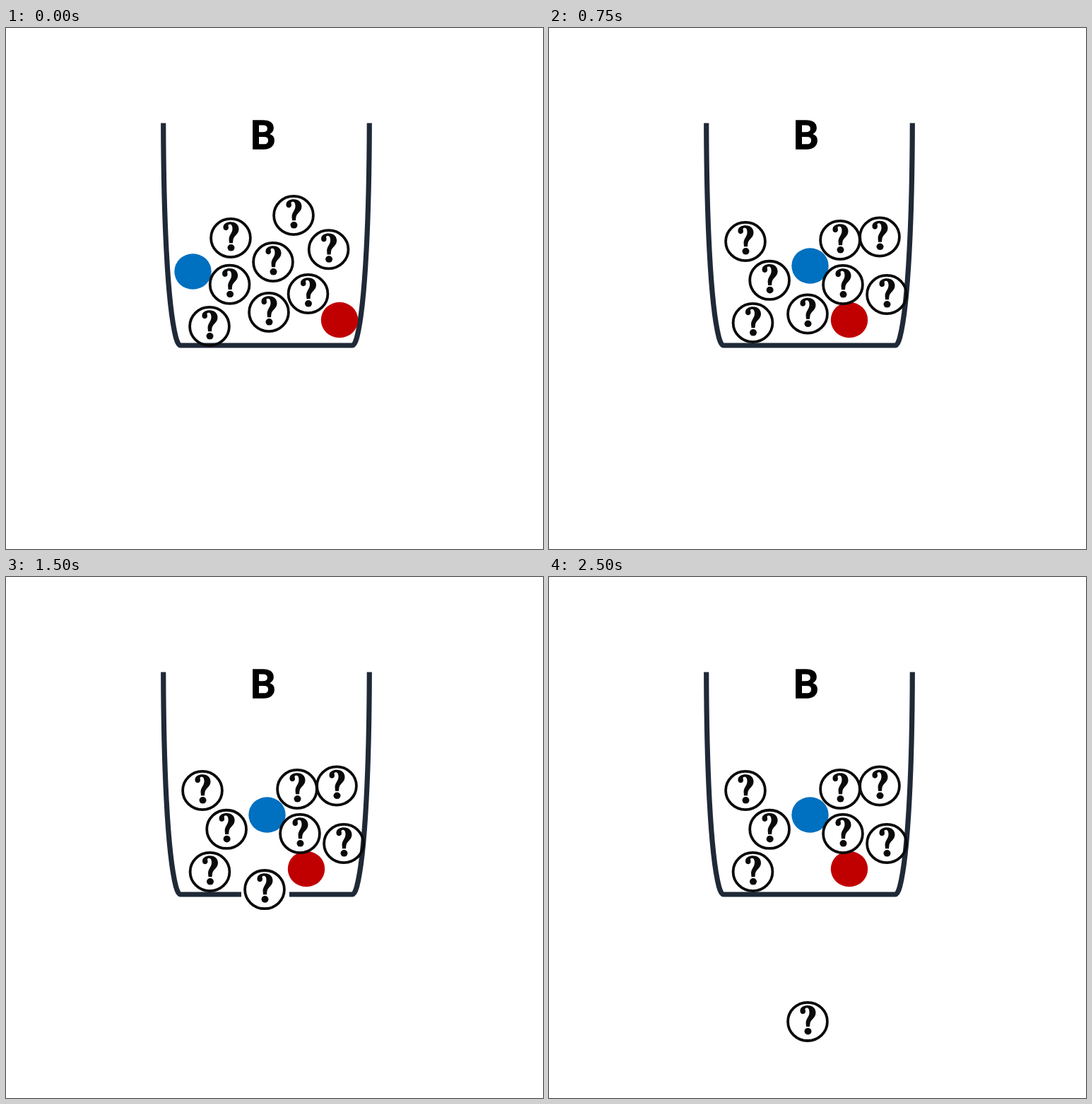
Recreate the animation shown at these times as an HTML page with a canvas. Size 760x737 px, loop 2750 ms.

```html
<!DOCTYPE html>
<html lang="en">
<head>
<meta charset="utf-8">
<title>Urn B</title>
<style>
  html, body { margin: 0; width: 100%; height: 100%; overflow: hidden; background: #fff; }
  canvas { display: block; }
</style>
</head>
<body>
<canvas id="stage" width="760" height="737"></canvas>
<script>
const ctx = document.getElementById("stage").getContext("2d");
const STEP = 250, STEPS = 11, LAST_MIX = 3;

const urn = new Path2D(
  "M222.7 134.5C223 260 228 390 240.5 438Q243.5 449 247 449" +
  "H490Q493.5 449 496.5 438C509 390 514 260 514.3 134.5");
const hook = new Path2D(
  "M-10.5-16C-10-20.5-5-22.8 0-22.8C7.5-22.8 11.5-18.5 11.5-12.5" +
  "C11.5-5 4-3.5 3.4 3L3 7.2L-2 7.2L-2.4 3C-3-4 2.5-6.5 2.5-13" +
  "C2.5-17.5 1-19.3-1.5-19.3C-3.5-19.3-3.8-18-3.2-16" +
  "C-2.5-13-4-10.8-6.8-10.8C-9.3-10.8-10.8-13-10.5-16Z");

const clamp = (v, lo, hi) => Math.max(lo, Math.min(hi, v));
const ramp = (v, from) => Math.max(0, v - from);

// Evenly spaced balls from one end to the other, bulging sideways by bow
function arc(x0, y0, x1, y1, bow = 0, count = 3) {
  const dx = x1 - x0, dy = y1 - y0, length = Math.hypot(dx, dy);
  return Array.from({ length: count }, (_, i) => {
    const t = i / (count - 1), bulge = 4 * t * (1 - t) * bow / length;
    return [x0 + dx * t + dy * bulge, y0 + dy * t - dx * bulge];
  });
}
const pair = (...ends) => arc(...ends, 0, 2);

const mixes = [
  { blue: [264.5, 344.5], red: [472, 413], arcs: [
    arc(318, 297, 288, 422, 14), arc(407, 265, 427.5, 376, 40), pair(378, 331, 372, 402)] },
  { blue: [283, 308], red: [425, 313.5], arcs: [
    arc(262, 354, 365, 412, 11), arc(353, 322, 445, 413, 2), pair(277.5, 415, 461.5, 351)] },
  { blue: [283, 363.5], red: [425, 369], arcs: [
    arc(281, 419.5, 462.5, 410, 0, 4), arc(341.5, 352.5, 460, 312, 6), [[310, 298]]] },
  { blue: [369.5, 336.5], red: [425, 413], arcs: [
    arc(278, 302, 288.5, 417, 29), pair(412, 300, 416, 363), pair(468, 295.5, 478, 377)] }
];

// Sinks slowly through the opening, then drops faster and faster
const drawnBall = k =>
  [366, 404.5 + 18.8 * clamp(k - 1, 0, 3) + 49 * ramp(k, 4) + 21 * ramp(k, 6)];

// The trapdoor widens, stays open and narrows again around k = 3
function gapWidth(k) {
  const away = Math.abs(k - 3);
  return away > 2 ? 0 : Math.min(68, 108 - 40 * away);
}

function ellipse(x, y, rx, ry) {
  ctx.beginPath();
  ctx.ellipse(x, y, rx, ry, 0, 0, Math.PI * 2);
}

function solidBall([x, y], color) {
  ctx.fillStyle = color;
  ellipse(x, y, 26.2, 25.3);
  ctx.fill();
}

function hiddenBall([x, y]) {
  ctx.save();
  ctx.translate(x, y);
  ctx.fillStyle = ctx.strokeStyle = "#0a0a0a";
  ctx.lineWidth = 3.8;
  ellipse(0, 0, 27.9, 27.1);
  ctx.stroke();
  ctx.fill(hook);
  ellipse(0.5, 13.8, 5, 4.8);
  ctx.fill();
  ctx.restore();
}

function drawUrn(gap) {
  ctx.strokeStyle = "#1f2937";
  ctx.lineWidth = 7.2;
  ctx.stroke(urn);
  if (gap) {
    ctx.fillStyle = "#fff";
    ctx.fillRect(367 - gap / 2, 440, gap, 15);
  }
  ctx.font = "bold 54.5px Lato, Carlito, sans-serif";
  ctx.textAlign = "center";
  ctx.fillStyle = ctx.strokeStyle = "#000";
  ctx.lineWidth = 1.6;
  ctx.fillText("B", 363.4, 170.5);
  ctx.strokeText("B", 363.4, 170.5);
}

function render(now) {
  const step = Math.floor(now / STEP) % STEPS;
  const mix = mixes[Math.min(step, LAST_MIX)];
  const k = step - LAST_MIX;

  ctx.fillStyle = "#fff";
  ctx.fillRect(0, 0, 760, 737);
  drawUrn(gapWidth(k));
  solidBall(mix.blue, "#0070c0");
  solidBall(mix.red, "#c00000");
  mix.arcs.flat().forEach(hiddenBall);
  if (k >= 0) hiddenBall(drawnBall(k));
}

const start = performance.now();
function tick() {
  render(performance.now() - start);
  requestAnimationFrame(tick);
}
tick();
</script>
</body>
</html>
```
